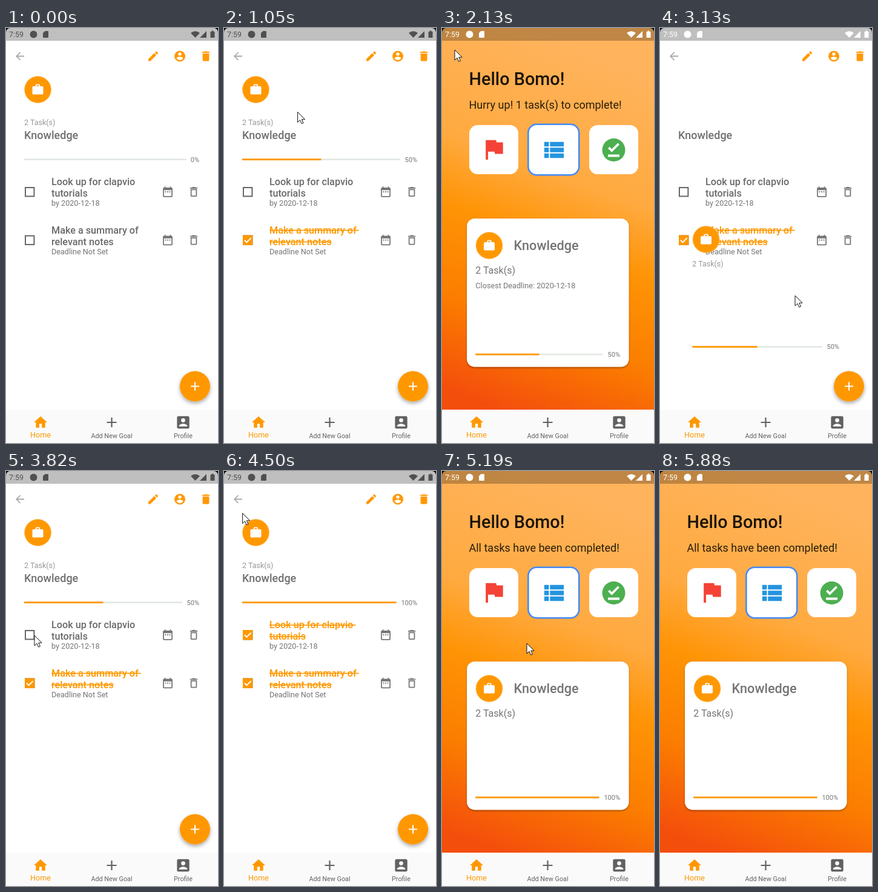
These frames come from a looping animation (350 by 684 pixels, 6190 ms). An HTML page:

```html
<!DOCTYPE html>
<html lang="en">
<head>
<meta charset="utf-8">
<title>Task list</title>
<style>
html, body { margin: 0; width: 100%; height: 100%; overflow: hidden; background: #fff; }
svg { display: block; width: 350px; height: 684px; font-family: Roboto, sans-serif; }
text { white-space: pre; }
.m { font-weight: 500; }
.g { fill: #757575; }
.o { fill: #ff9800; }
</style>
</head>
<body>
<svg viewBox="0 0 350 684">
  <defs>
    <linearGradient id="sky" gradientUnits="userSpaceOnUse" x1="260" y1="50" x2="50" y2="610">
      <stop offset="0" stop-color="#ffb35c"/>
      <stop offset=".34" stop-color="#ffaa40"/>
      <stop offset=".52" stop-color="#ff9406"/>
      <stop offset=".76" stop-color="#fb7d00"/>
      <stop offset="1" stop-color="#f44e0c"/>
    </linearGradient>
    <linearGradient id="hazard" gradientUnits="userSpaceOnUse" x1="0" y1="0" x2="8.5" y2="8.5" spreadMethod="repeat">
      <stop offset=".25" stop-color="#404040"/><stop offset=".25" stop-color="#ffff40"/>
      <stop offset=".75" stop-color="#ffff40"/><stop offset=".75" stop-color="#404040"/>
    </linearGradient>
    <filter id="shade" x="-30%" y="-30%" width="160%" height="170%">
      <feDropShadow dx="0" dy="3" stdDeviation="3" flood-opacity=".35"/>
    </filter>
    <filter id="low" x="-10%" y="-10%" width="120%" height="120%">
      <feDropShadow dx="0" dy="1.5" stdDeviation="1.5" flood-opacity=".4"/>
    </filter>
  </defs>

  <g id="home">
    <rect width="350" height="684" fill="url(#sky)"/>
    <text x="44.5" y="94" font-size="28.8" class="m" fill="#1c1408">Hello Bomo!</text>
    <text id="status" x="44.5" y="133" font-size="18" fill="#2a1c08"></text>
    <g fill="#fff">
      <rect x="45" y="160" width="81" height="81" rx="14"/>
      <rect x="142.3" y="158.8" width="83.9" height="83.4" rx="14" stroke="#448aff" stroke-width="2.6"/>
      <rect x="243" y="160" width="81" height="81" rx="14"/>
      <rect x="41" y="314" width="267.5" height="244.5" rx="13" filter="url(#low)"/>
    </g>
    <text x="118.5" y="366" font-size="21.6" class="m g">Knowledge</text>
  </g>

  <g id="detail">
    <rect width="350" height="684" fill="#fff"/>
    <text x="30" y="183" font-size="18" class="m" fill="#707070">Knowledge</text>
    <g id="tasks"></g>
    <circle cx="312" cy="590.5" r="25" class="o" filter="url(#shade)"/>
    <path d="M305 590.5h14M312 583.5v14" stroke="#fff" stroke-width="2"/>
  </g>

  <rect width="350" height="21" opacity=".25"/>
  <g id="bar">
    <text x="5" y="15" font-size="12.4">7:59</text>
    <circle cx="45.5" cy="10.5" r="6"/>
    <path d="M305 8.2q7.500-6 15 0L312.500 16zM331 5v11h-11zM337.500 6h2V4.500h3V6h2v10h-7z"/>
  </g>

  <g id="nav">
    <rect y="629" width="350" height="55" fill="#fafafa"/>
    <path d="M166.500 650h16M174.500 642v16" stroke="#616161" stroke-width="2.200"/>
    <g text-anchor="middle" font-size="10.8" fill="#616161">
      <text x="57" y="675" font-size="12.6" class="o">Home</text>
      <text x="174.500" y="676">Add New Goal</text>
      <text x="292.500" y="676">Profile</text>
    </g>
  </g>

  <g id="badge">
    <circle r="22" class="o" stroke="#ffc266" stroke-width=".8"/>
  </g>
  <g id="count">
    <text id="countText" class="g">2 Task(s)</text>
    <text id="deadline" y="39" font-size="12.7" class="g">Closest Deadline: 2020-12-18</text>
  </g>
  <g id="overflow">
    <rect id="stripe" fill="url(#hazard)"/>
    <rect id="plate" y="-2" height="7" fill="#fff"/>
    <text id="warn" y="4.100" font-size="6.300" font-weight="800" text-anchor="middle" fill="#900"></text>
  </g>
  <g id="progress">
    <rect id="track" y="-1.300" height="2.600" fill="#e2e8e2"/>
    <rect id="fill" y="-1.400" height="2.800" class="o"/>
    <text id="percent" y="4" font-size="11" text-anchor="end" class="g"></text>
  </g>

  <path d="M0 0h7A7 7 0 0 0 0 7zM350 0h-7a7 7 0 0 1 7 7z"/>
  <path id="cursor" d="M0 0V17l4-3.800 2.600 6 2.800-1.200-2.600-5.800H12z" fill="#fff" stroke="#111" stroke-linejoin="round"/>
</svg>

<script>
const LOOP = 6190, ORANGE = '#ff9800', GREY = '#757575';
const $ = id => document.getElementById(id);
const set = (id, attrs) => { for (const k in attrs) $(id).setAttribute(k, attrs[k]); };
const show = (id, on) => { $(id).style.display = on ? '' : 'none'; };
const mix = (a, b, k) => a + (b - a) * k;
const clamp = v => Math.max(0, Math.min(1, v));

const shapes = {
  back: 'M20 11H7.83l5.59-5.59L12 4l-8 8 8 8 1.41-1.41L7.83 13H20z',
  edit: 'M3 17.25V21h3.75L17.81 9.94l-3.75-3.75zM20.71 7.04c.39-.39.39-1.02 0-1.41l-2.34-2.34c-.39-.39-1.02-.39-1.41 0l-1.83 1.83 3.75 3.75z',
  user: 'M12 2a10 10 0 1 0 0 20a10 10 0 0 0 0-20zm0 3a3 3 0 0 1 0 6a3 3 0 0 1 0-6zm0 14.2c-2.5 0-4.71-1.28-6-3.22.03-1.99 4-3.08 6-3.08 1.99 0 5.97 1.09 6 3.08-1.29 1.94-3.5 3.22-6 3.22z',
  bin: 'M6 19c0 1.1.9 2 2 2h8c1.1 0 2-.9 2-2V7H6zM19 4h-3.5l-1-1h-5l-1 1H5v2h14z',
  binLine: 'M6 19c0 1.1.9 2 2 2h8c1.1 0 2-.9 2-2V7H6zM8 9h8v10H8zm7.5-5l-1-1h-5l-1 1H5v2h14V4z',
  date: 'M9 11H7v2h2zm4 0h-2v2h2zm4 0h-2v2h2zm2-7h-1V2h-2v2H8V2H6v2H5c-1.1 0-2 .9-2 2v14c0 1.1.9 2 2 2h14c1.1 0 2-.9 2-2V6c0-1.1-.9-2-2-2zm0 16H5V9h14z',
  house: 'M10 20v-6h4v6h5v-8h3L12 3 2 12h3v8z',
  box: 'M3 5v14c0 1.1.9 2 2 2h14c1.1 0 2-.9 2-2V5c0-1.1-.9-2-2-2H5c-1.1 0-2 .9-2 2zm12 4a3 3 0 0 1-6 0a3 3 0 0 1 6 0zm-9 8c0-2 4-3.1 6-3.1s6 1.1 6 3.1v1H6z',
  work: 'M20 6h-4V4c0-1.1-.9-2-2-2h-4c-1.1 0-2 .9-2 2v2H4c-1.1 0-2 .9-2 2v11c0 1.1.9 2 2 2h16c1.1 0 2-.9 2-2V8c0-1.1-.9-2-2-2zm-6 0h-4V4h4z',
  card: 'M18 2h-8L4 8v12c0 1.1.9 2 2 2h12c1.1 0 2-.9 2-2V4c0-1.1-.9-2-2-2z',
  flag: 'M14.4 6L14 4H5v17h2v-7h5.6l.4 2h7V6z',
  list: 'M4 14h4v-4H4zm0 5h4v-4H4zM4 9h4V5H4zm5 5h12v-4H9zm0 5h12v-4H9zM9 5v4h12V5z',
  done: 'M12 2a10 10 0 1 0 0 20a10 10 0 0 0 0-20zm5 16H7v-2h10zm-6.7-4L7 10.7l1.4-1.4 1.9 1.9 5.3-5.3L17 7.3z'
};

// Places a 24-unit icon centred on (x, y)
function icon(parent, name, x, y, scale, color) {
  $(parent).insertAdjacentHTML('beforeend', `<path d="${shapes[name]}" fill-rule="evenodd"
    transform="translate(${x} ${y}) scale(${scale}) translate(-12 -12)" ${color ? `fill="${color}"` : ''}/>`);
}

icon('detail', 'back', 23, 46.5, .88, '#aaa');
icon('detail', 'edit', 243, 46.5, .9, ORANGE);
icon('detail', 'user', 287, 46.5, .9, ORANGE);
icon('detail', 'bin', 330, 46.5, .9, ORANGE);
icon('home', 'flag', 85.5, 200, 1.9, '#f44336');
icon('home', 'list', 184, 201, 1.9, '#2494e0');
icon('home', 'done', 283.5, 201, 1.9, '#4caf50');
icon('bar', 'card', 65.5, 10.5, .56);
icon('nav', 'house', 57, 650, 1.1, ORANGE);
icon('nav', 'box', 292.5, 650, 1.13, '#616161');
icon('badge', 'work', 0, 0, .9, '#fff');

const tasks = [
  { y: 270, at: 3970, lines: ['Look up for clapvio ', 'tutorials'], due: 'by 2020-12-18' },
  { y: 349.5, at: 670, lines: ['Make a summary of ', 'relevant notes'], due: 'Deadline Not Set' }
];
tasks.forEach((task, i) => {
  const { y, lines, due } = task;
  $('tasks').insertAdjacentHTML('beforeend', `
    <rect x="32" y="${y - 7}" width="14.400" height="14.400" fill="none" stroke="#666" stroke-width="2"/>
    <g id="tick${i}"><rect x="31" y="${y - 8}" width="16.400" height="16.400" class="o"/>
      <path d="M34 ${y + .2}l3.500 3.500 7-7" fill="none" stroke="#fff" stroke-width="2"/></g>
    <g id="name${i}" font-size="16.200" class="m">
      <text x="75" y="${y - 11}">${lines[0]}</text><text x="75" y="${y + 8}">${lines[1]}</text></g>
    <text x="75" y="${y + 23}" font-size="12.600" class="g">${due}</text>`);
  icon('tasks', 'date', 267, y, .88, GREY);
  icon('tasks', 'binLine', 310, y, .88, GREY);
});

// Cubic bezier (.4, 0, .2, 1)
function ease(x) {
  x = clamp(x);
  let lo = 0, hi = 1;
  for (let i = 0; i < 30; i++) {
    const s = (lo + hi) / 2, r = 1 - s;
    if (1.2 * s * r * r + .6 * s * s * r + s * s * s < x) lo = s; else hi = s;
  }
  return lo * lo * (3 - 2 * lo);
}

// Pointer stops: time, x, y
const path = [
  [130, 130, 690], [360, 62, 410], [440, 48, 326], [510, 44, 348], [740, 44, 348],
  [1050, 122, 139], [1280, 32, 23], [1440, 21, 36], [2360, 21, 36], [2670, 223, 441],
  [3360, 223, 441], [3510, 142, 352], [3590, 90, 275], [3670, 52, 222], [3740, 44, 245],
  [3820, 47, 271], [4050, 47, 271], [4330, 45, 140], [4580, 24, 37], [4880, 24, 37],
  [4960, 35, 51], [5190, 140, 284], [5420, 140, 284], [5880, 200, 690]
];

function moveCursor(t) {
  const i = path.findIndex(p => p[0] > t);
  show('cursor', i > 0);
  if (i < 1) return;
  const [a, b] = [path[i - 1], path[i]], k = (t - a[0]) / (b[0] - a[0]);
  set('cursor', { transform: `translate(${mix(a[1], b[1], k)} ${mix(a[2], b[2], k)})` });
}

const POPS = [[1640, 1970], [4690, 5000]], PUSH = 3050;

function draw(t) {
  const onHome = t >= POPS[0][1] && t < PUSH || t >= POPS[1][1];
  const popping = POPS.some(([a, b]) => t >= a && t < b);
  const allDone = t >= 3970;
  const percent = t < 670 ? 0 : allDone ? 100 : 50;

  show('home', onHome);
  show('detail', !onHome);
  $('status').textContent = allDone ? 'All tasks have been completed!' : 'Hurry up! 1 task(s) to complete!';
  const lightBar = t >= 2130 && t < 3280 || t >= 5190;
  set('bar', { fill: lightBar ? '#fff' : '#505050' });

  tasks.forEach((task, i) => {
    const on = t >= task.at;
    show('tick' + i, on);
    set('name' + i, { fill: on ? ORANGE : '#6a6a6a', 'text-decoration': on ? 'line-through' : 'none' });
  });

  // Shared parts fly between the pages: 0 is the list page, 1 the card
  let q = onHome ? 1 : 0, qx = q;
  if (popping) {
    q = ease((t - POPS[t < PUSH ? 0 : 1][0]) / 300);
    qx = 1 - (1 - q) ** 2;
  } else if (t >= PUSH && !onHome) {
    q = 1 - ease((t - 3095) / 300);
    qx = q * q;
  }
  const left = mix(30, 55.3, qx), right = mix(319, 294, qx);
  set('badge', { transform: `translate(${mix(52.5, 78, qx)} ${mix(101.5, 358.5, q)})` });

  const big = onHome || popping;
  set('count', { transform: `translate(${left} ${mix(148, 390, q)})` });
  set('countText', { y: big ? 15 : 12, 'font-size': big ? 16 : 12.5, opacity: big ? 1 : .75 });
  show('deadline', big && !allDone);

  const short = 171.45 * (1 - q);
  show('overflow', popping && short > .001);
  if (popping) {
    const end = mix(82, 294, qx), mid = (left + end) / 2, h = mix(15, 41, q) / 10;
    set('overflow', { transform: `translate(0 ${mix(163, 430, q) - h})` });
    set('stripe', { x: left, width: end - left, height: h });
    const amount = short > 10 ? short.toFixed(0) : short > 1 ? short.toFixed(1) : short.toPrecision(3);
    $('warn').textContent = `BOTTOM OVERFLOWED BY ${amount} PIXELS`;
    set('warn', { x: mid });
    const w = $('warn').getComputedTextLength();
    set('plate', { x: mid - w / 2, width: w });
  }

  $('percent').textContent = percent + '%';
  const length = right - left - { 0: 21, 50: 28, 100: 34.5 }[percent];
  set('progress', { transform: `translate(0 ${mix(216.7, 538, q)})` });
  set('track', { x: left, width: length });
  set('fill', { x: left, width: length * percent / 100 });
  set('percent', { x: right });

  moveCursor(t);
}

const start = performance.now();
function tick() {
  draw((performance.now() - start) % LOOP);
  requestAnimationFrame(tick);
}
tick();
</script>
</body>
</html>
```
